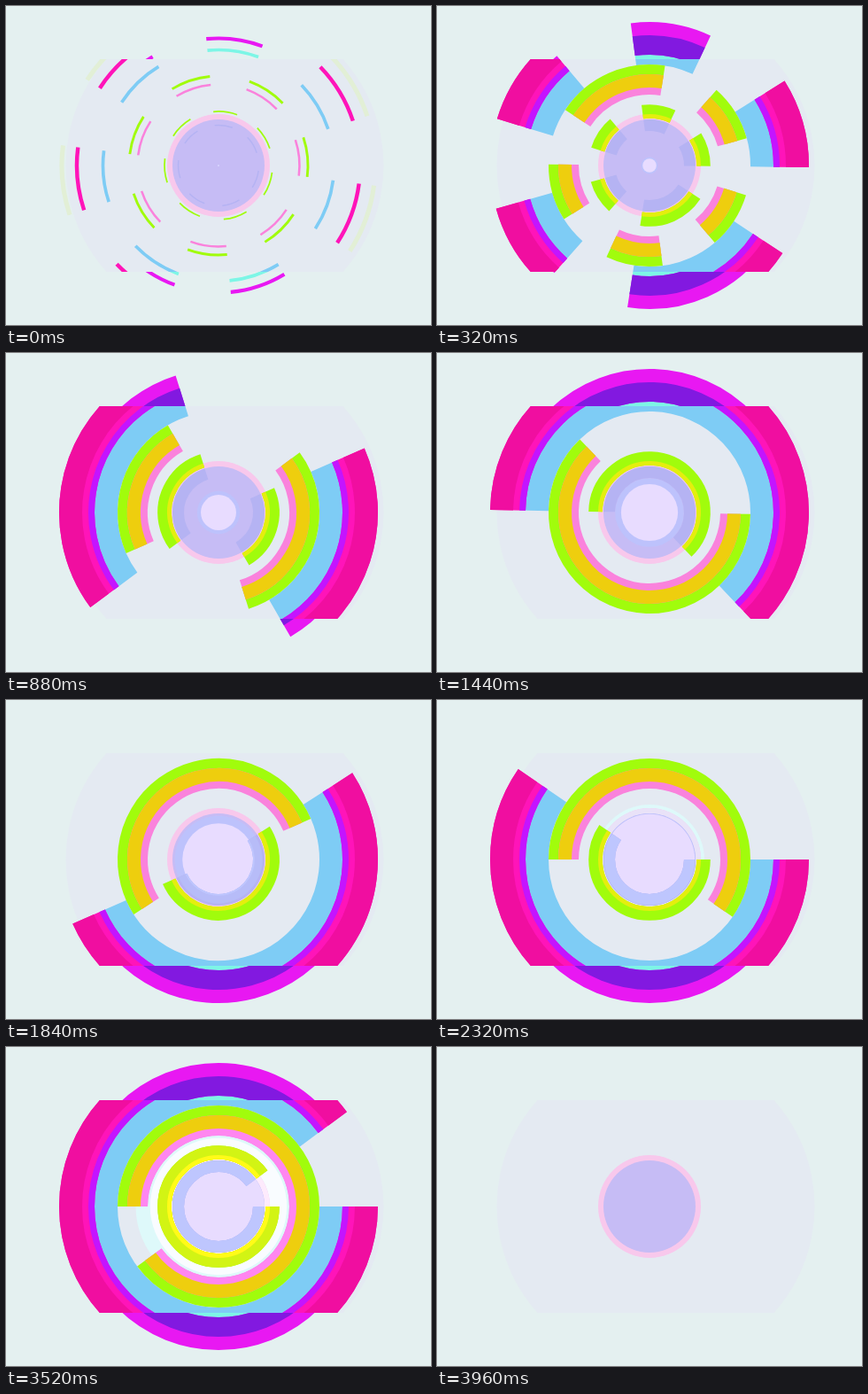
These frames come from a looping animation (480 px wide and 360 px high, 4000 ms). An HTML page with a canvas:

```html
<!DOCTYPE html>
<html lang="en">
<head>
<meta charset="utf-8">
<title>Rings</title>
<style>
html, body { margin: 0; width: 100%; height: 100%; overflow: hidden; background: #e4f0f0; }
canvas { display: block; width: 480px; height: 360px; }
</style>
</head>
<body>
<canvas id="stage" width="480" height="360"></canvas>
<script>
const ctx = document.getElementById('stage').getContext('2d');
const CX = 240, CY = 180, TAU = Math.PI * 2;
const STEP = 40, STEPS = 100, LAST = STEPS - 1;
const rad = deg => deg * Math.PI / 180;

function disc(x, r, color) {
  ctx.fillStyle = color;
  ctx.beginPath();
  ctx.arc(x, CY, r, 0, TAU);
  ctx.fill();
}

function clipped(rects, draw) {
  ctx.save();
  ctx.beginPath();
  for (const [y, h] of rects) ctx.rect(0, y, 480, h);
  ctx.clip();
  draw();
  ctx.restore();
}

// Equal dashes and gaps, laid clockwise from the seam and cut off after one turn.
function dashedBand([lo, hi], color, seam, dash) {
  if (hi <= lo) return;
  const r = (lo + hi) / 2;
  ctx.strokeStyle = color;
  ctx.lineWidth = hi - lo;
  ctx.beginPath();
  for (let a = 0; a < 359.99; a += 2 * dash) {
    const from = rad(seam + a), to = rad(seam + Math.min(a + dash, 360));
    ctx.moveTo(CX + r * Math.cos(from), CY + r * Math.sin(from));
    ctx.arc(CX, CY, r, from, to);
  }
  ctx.stroke();
}

const overlap = (a, b) => [Math.max(a[0], b[0]), Math.min(a[1], b[1])];

function draw(i) {
  const grow = Math.min(1, i / 9);
  const dash = Math.max(360 / 14, 360 * i / LAST);
  const seam = i < 50 ? 360 * i / 49 : 0;
  const core = 0.868 * i, halo = 1.05 * i;
  const span = (r, width) => [r - width * grow / 2, r + width * grow / 2];
  const front = (range, color) => dashedBand(range, color, seam, dash);
  const back = (range, color) => dashedBand(range, color, seam + 180, dash);

  ctx.fillStyle = '#e4f0f0';
  ctx.fillRect(0, 0, 480, 360);
  clipped([[60, 240]], () => disc(247, 179.5, '#e4eaf2'));

  // Centre: the halo and the core tint whatever lies beneath them.
  const layers = [['#e4eaf2', '#def9fa', '#f9fcff', 1e3],
                  ['#f8c8ec', '#e9e2f8', '#fdeafc', 58],
                  ['#c6bcf5', '#bdc2fc', '#e8dcff', 52]];
  for (const [base, haloColor, coreColor, limit] of layers) {
    if (limit < 1e3) disc(CX, limit, base);
    if (i) {
      disc(CX, Math.min(halo, limit), haloColor);
      disc(CX, Math.min(core, limit), coreColor);
    }
  }
  if (!i) return;

  // Outer ring, coloured differently in the middle strip and beyond it.
  const blue = span(130.5, 33);
  const pink = span(160, 40);
  const pale = overlap(span(177, 46), [0, 180]);
  const magenta = span(143.5, 37);
  clipped([[60, 240]], () => {
    front(pale, '#e2efd6');
    front(blue, '#7eccf5');
    front(pink, '#ff14b9');
    front(overlap(pink, pale), '#f00ea0');
    front(overlap(pink, blue), '#c414ff');
  });
  clipped([[0, 60], [300, 60]], () => {
    front(blue, '#7df6e6');
    front(magenta, '#e818f2');
    front(overlap(magenta, blue), '#8219e0');
  });

  // Middle ring
  const lime = span(101, 26);
  const rose = span(91.5, 23);
  back(lime, '#a1fc0c');
  back(rose, '#fa82dc');
  back(overlap(rose, [0, halo]), '#ff86f0');
  back(overlap(rose, lime), '#eece0e');

  // Inner ring
  const edge = span(61, 15.6);
  const violet = span(45.5, 13);
  front(violet, '#b5b3f3');
  front(overlap(violet, [0, halo]), '#b7bcf8');
  front(overlap(violet, [0, core]), '#bec6fe');
  front(edge, '#a1fc0c');
  front(overlap(edge, [0, core]), '#d2f414');
  front(overlap(edge, [0, 58]), '#e4ee0e');
  front(overlap(edge, [0, Math.min(core, 58)]), '#fffb18');
}

const start = performance.now();
function tick() {
  const t = performance.now() - start;
  draw((Math.floor(t / STEP) + 1) % STEPS);
  requestAnimationFrame(tick);
}
tick();
</script>
</body>
</html>
```
